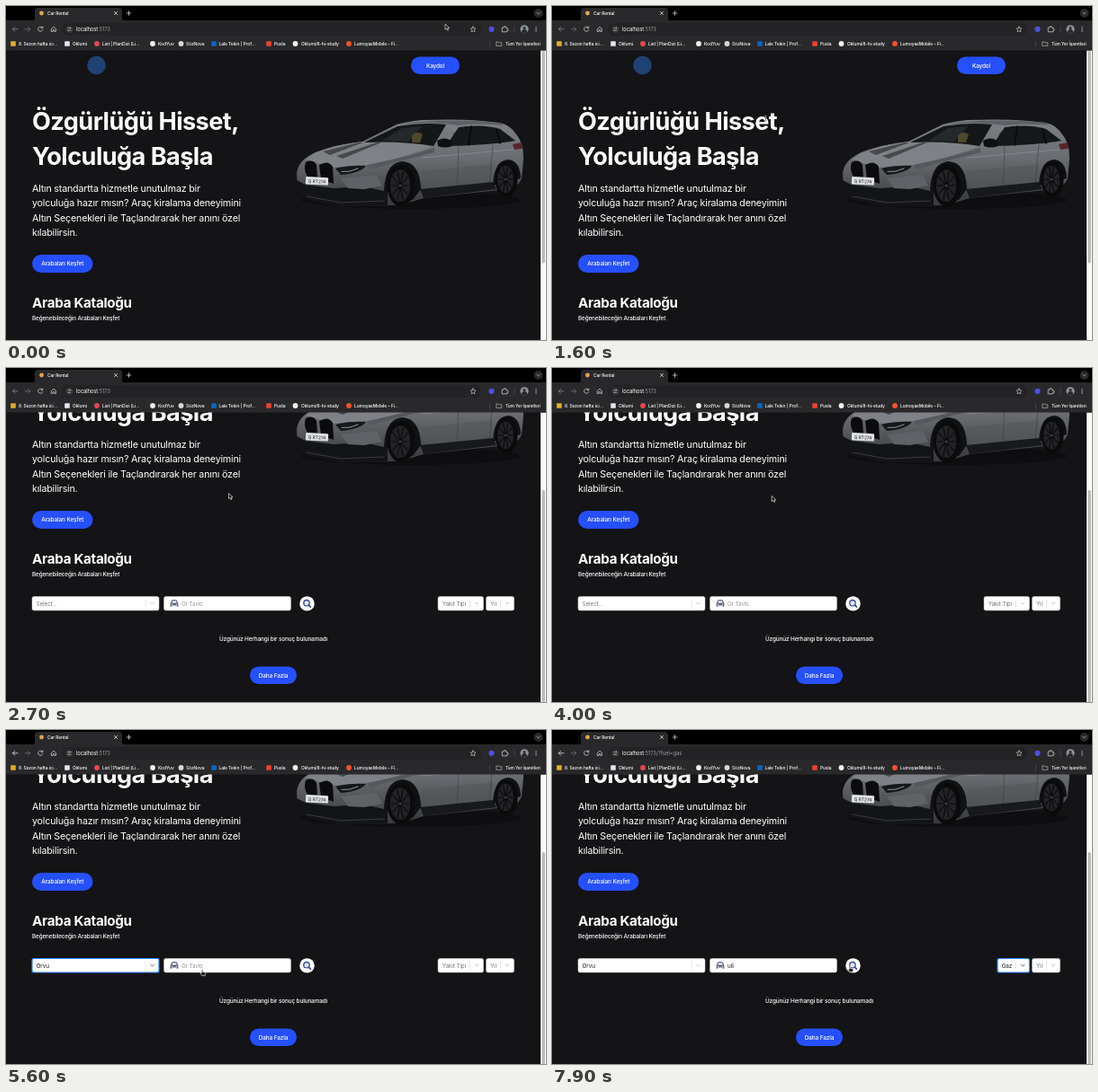
An HTML page that plays this animation: 600 px wide and 372 px high, repeating every 8000 ms.

```html
<!DOCTYPE html>
<html lang="tr">
<head>
<meta charset="utf-8">
<title>Car Rental</title>
<style>
html, body { margin: 0; width: 100%; height: 100%; overflow: hidden; background: #141316; }
svg { display: block; width: 100vw; height: 100vh; }
text { font-family: Inter, "Noto Sans", sans-serif; letter-spacing: -0.018em; white-space: pre; }
</style>
</head>
<body>
<svg id="stage" viewBox="0 0 600 372" xmlns="http://www.w3.org/2000/svg"></svg>
<script>
const LOOP = 8000, MAX_SCROLL = 118, BLUE = '#264fff', FOCUS = '#2684ff';
const brands = ['Ovira', 'Beta Soreno', 'Calder Morvin', 'Orvu', 'Harvelt', 'QZT'];
const fuels = ['Gaz', 'Dizel', 'Elektrik'];

// Markup helpers
const text = (x, y, size, s, fill = '#fff', more = '') =>
  `<text x="${x}" y="${y}" font-size="${size}" fill="${fill}" ${more}>${s}</text>`;
const rect = (x, y, w, h, fill, r = 0, more = '') =>
  `<rect x="${x}" y="${y}" width="${w}" height="${h}" rx="${r}" fill="${fill}" ${more}/>`;
const dot = (x, y, r, fill, more = '') => `<circle cx="${x}" cy="${y}" r="${r}" fill="${fill}" ${more}/>`;
const path = (d, fill, more = '') => `<path d="${d}" fill="${fill}" ${more}/>`;
const line = (d, color, w = 0.7, more = '') =>
  path(d, 'none', `stroke="${color}" stroke-width="${w}" stroke-linecap="round" stroke-linejoin="round" ${more}`);
const MEDIUM = 'font-weight="500"', MIDDLE = 'text-anchor="middle"';
const pill = (x, y, w, h, label) =>
  rect(x, y, w, h, BLUE, h / 2) + text(x + w / 2, y + h / 2 + 2.3, 6.4, label, '#fff', `${MEDIUM} ${MIDDLE}`);
const chevron = (x, y, id) => line(`M${x - 2} ${y - 1}l2 2 2-2`, '#bbb', 0.8, `id="${id}"`);

function wheel(x, y, rx, ry) {
  let s = `<ellipse cx="${x}" cy="${y}" rx="${rx}" ry="${ry}" fill="#0b0b0c"/>` +
    `<ellipse cx="${x - 1}" cy="${y}" rx="${rx * 0.72}" ry="${ry * 0.76}" fill="#222326"/>`;
  for (let i = 0; i < 10; i++) {
    const a = i * Math.PI / 5;
    s += line(`M${x - 1} ${y}l${(rx * 0.65 * Math.cos(a)).toFixed(1)} ${(ry * 0.7 * Math.sin(a)).toFixed(1)}`, '#0a0a0b', 1.1);
  }
  return s + dot(x - 1, y, 1.5, '#3c3e42');
}

function car() {
  return '<ellipse cx="450" cy="216" rx="122" ry="10" fill="#0c0b0d" opacity=".7"/>' +
    // body
    path('M323 186Q325 171 344 163Q368 154 396 151L434 132Q444 129 462 127Q515 125 548 130Q560 132 567 143Q575 152 575 170L573 192Q569 202 556 204L464 214L438 222L372 223L333 214Q323 206 323 186Z', 'url(#paint)') +
    path('M436 132Q480 124 548 130L553 133Q528 130 503 133L486 131Q460 129 436 132Z', '#5d6064') +
    // hood and its stripes
    path('M344 163Q368 154 396 151Q440 149 474 156Q446 168 402 177L362 180L333 171Z', '#7e8185') +
    path('M352 162L392 152 397 152 360 166ZM367 167L412 152 417 152 374 170Z', '#46484c') +
    path('M402 177Q446 168 476 158L476 163Q440 172 404 182Z', '#55585c') +
    // glass
    path('M398 152L435 134Q462 129 489 132L475 156Q440 150 398 152Z', '#141618') +
    path('M418 150L440 136 462 134 447 151Z', '#25292b') +
    path('M451 144q6-6 12-1l-3 9h-9zM497 142q5-5 9-1l-3 11h-7z', '#4d472c') +
    path('M489 156L503 135Q531 131 549 137L566 150Q540 155 489 156Z', '#15181a') +
    line('M517 134l-3 21M545 137l4 16', '#08090a', 1.6) +
    path('M479 150q8-5 16 0l1 6q-9 3-16 0z', '#0e0f10') +
    // side
    line('M462 169L574 159', '#8d9094', 0.8) +
    path('M462 184L541 176 541 198 463 206Z', '#55585c', 'opacity=".6"') +
    line('M503 156l-2 52M541 154l-4 44', '#3c3e42', 0.6) +
    path('M460 204L541 196 545 204 464 214Z', '#18191b') +
    // nose
    path('M333 174Q341 170 345 177L346 191 335 190Q330 182 333 174ZM348 177Q358 171 363 179L364 198 350 193Z', '#0b0b0d') +
    path('M366 181Q382 177 400 178Q394 186 372 188Z', '#15181b') +
    line('M373 184.5q9 1 18-3.5', '#aeb6bd', 0.8) +
    path('M323 194L333 199 364 203 398 201 424 207 424 222 372 224 333 215Q324 207 323 194Z', '#131416') +
    path('M372 192L412 188 418 200 398 204 380 203Z', '#5f6266') +
    line('M334 212L372 219 420 217', '#3f4145', 0.9) +
    rect(333, 190.5, 25, 8.5, '#dfe1e4', 1, 'transform="rotate(3 345 195)"') +
    text(335.5, 197.2, 5, 'Q RT274', '#222', 'transform="rotate(3 345 195)"') +
    path('M420 206Q421 175 440 173Q460 174 461 204L452 216Z', '#101113') +
    wheel(439, 200, 15.5, 23.5) +
    path('M541 200Q542 172 558 171Q571 172 572 192Z', '#101113') +
    wheel(556, 193, 12.5, 20) +
    path('M563 154l10-2 1 7-9 1z', '#54262a');
}

function page() {
  const bold = (x, y, size, s) => text(x, y, size, s, '#fff', 'font-weight="700" style="letter-spacing:-.02em"');
  const para = ['Altın standartta hizmetle unutulmaz bir', 'yolculuğa hazır mısın? Araç kiralama deneyimini',
    'Altın Seçenekleri ile Taçlandırarak her anını özel', 'kılabilirsin.'];
  const box = (x, w, id) => rect(x, 372.5, w, 15.5, '#fff', 2, `id="${id}" stroke="#ccc" stroke-width=".5"`);
  return dot(100.5, 66, 10.3, '#1f4272') + pill(450, 56.5, 54, 19.5, 'Kaydol') +
    bold(29, 138, 27.1, 'Özgürlüğü Hisset,') + bold(29, 177, 27.1, 'Yolculuğa Başla') +
    para.map((s, i) => text(29, 206.7 + i * 16.5, 10.7, s)).join('') +
    pill(29, 277, 67.5, 20, 'Arabaları Keşfet') + car() +
    bold(29, 336.3, 15.2, 'Araba Kataloğu') +
    text(29, 350.2, 6.35, 'Beğenebileceğin Arabaları Keşfet', '#fff', MEDIUM) +
    box(29, 141, 'brandBox') + text(33.5, 382.6, 6.4, '', '#777', 'id="brandText"') +
    line('M155 376v8.5', '#ccc', 0.5) + chevron(162.5, 380.2, 'brandArrow') +
    box(175.5, 141, 'modelBox') +
    path('M182.6 380.2l1.6-3.6q2.8-1 5.6 0l1.6 3.6v3.6h-1.7v-1.2h-5.4v1.2h-1.7z', '#626a82') +
    path('M184.3 379.4l.8-2h3.8l.8 2z', '#fff') + dot(184.3, 381.3, 0.6, '#fff') + dot(189.7, 381.3, 0.6, '#fff') +
    text(195, 382.5, 6.2, '', '#999', 'id="modelText"') +
    dot(334.5, 380.4, 8.2, '#fff') +
    dot(334, 379.7, 3.2, '#e2e9fb', 'stroke="#38478f" stroke-width="1.3"') + line('M336.4 382.1l2 2', '#38478f', 1.6) +
    box(480, 50.5, 'fuelBox') + text(484.7, 382.6, 6.4, '', '#777', 'id="fuelText"') +
    line('M515.5 376v8.5', '#ccc', 0.5) + chevron(523, 380.2, 'fuelArrow') +
    box(533.5, 31, 'yearBox') + text(538, 382.6, 6.4, 'Yıl', '#777') +
    line('M549.5 376v8.5', '#ccc', 0.5) + chevron(557, 380.2, 'yearArrow') +
    text(297, 421.7, 6.4, 'Üzgünüz Herhangi bir sonuç bulunamadı', '#fff', `${MEDIUM} ${MIDDLE}`) +
    pill(271, 450.5, 52, 19.5, 'Daha Fazla') +
    menu('brandMenu', 29, 141, 125, brands) +
    menu('fuelMenu', 480, 50.5, 53, fuels);
}

function menu(id, x, w, h, items) {
  const bar = items.length > 3 ? rect(x + w - 5, 391, 5, h, '#f2f2f2') + rect(x + w - 4, 393, 3.2, 12, '#b9b9b9', 1.6) : '';
  return `<g id="${id}">` + rect(x, 391, w, h, '#fff', 2, 'stroke="#ccc" stroke-width=".4"') +
    rect(x, 392.8, w - (bar ? 5 : 0), 16.4, '#deebff', 0, `id="${id}Hover"`) +
    items.map((s, i) => text(x + 5, 403.3 + i * 16.4, 6.4, s, '#222')).join('') + bar + '</g>';
}

function browser() {
  const grey = '#c9c9cb';
  const marks = [
    [8, '#e0ae2f', 14, '8. Sezon hafta ici...', 1], [68, '#dfe6f2', 74, 'Oklumi', 1],
    [101, '#e5484d', 107, 'List | PlanDizi (Li...'], [163, '#f2f2f2', 169, 'KodYuv'],
    [194.5, '#d8d8d8', 200, 'SözNova'], [231, '#0a66c2', 236.5, 'Lale Tekin | Prof...', 1],
    [292, '#ea4335', 298, 'Pusla', 1], [321.5, '#f2f2f2', 328, 'Oklumi/8-hi-study'],
    [381, '#f0532d', 387, 'LumoyasMobile – Fi...']];
  return rect(0, 0, 600, 16.5, '#000') + rect(0, 16, 600, 33.5, '#29292b') +
    path('M29 16.5q3 0 3-3V6q0-4 4-4h89q4 0 4 4v7.5q0 3 3 3z', '#29292b') +
    dot(39.5, 8, 2.4, '#e3a54f') + text(46, 9.8, 4.9, 'Car Rental', '#fff', MEDIUM) +
    line('M120.4 6.4l3.2 3.2m0-3.2l-3.2 3.2M134.2 8h4.6m-2.3-2.3v4.6', '#eee', 0.7) +
    dot(591.5, 8, 5, '#29292b') + line('M589.8 7.3l1.7 1.6 1.7-1.6', '#ddd') +
    line('M13 25.8h-5.6m2.4-2.4l-2.4 2.4 2.4 2.4', '#888', 0.8, 'id="back"') +
    line('M21.2 25.8h5.6m-2.4-2.4l2.4 2.4-2.4 2.4', '#737376', 0.8) +
    line('M40.5 24.4a2.6 2.6 0 1 0 .2 2.2M40.8 22.8v1.8h-1.8', grey, 0.8) +
    line('M50.6 25.4l2.4-2.2 2.4 2.2v3h-1.6v-1.8h-1.6v1.8h-1.6z', grey, 0.8) +
    rect(62, 19, 466, 14, '#232325', 7) + dot(70.5, 25.8, 4.4, '#343437') +
    line('M68.7 24.5h2m-2 2.6h.5m1 0h2', grey, 0.6) + dot(71.6, 24.5, 0.7, grey) + dot(69.6, 27.1, 0.7, grey) +
    `<text x="78" y="27.9" font-size="5.85" fill="#fff">localhost<tspan fill="#9a9a9d" id="url"></tspan></text>` +
    line('M519 22.9l.9 1.9 2.1.3-1.5 1.5.4 2.1-1.9-1-1.9 1 .4-2.1-1.5-1.5 2.1-.3z', grey, 0.7) +
    dot(539.5, 25.8, 3.1, '#4c50dc') +
    line('M551.6 24h1.7a1 1 0 1 1 1.8 0h1.6v1.6a1 1 0 1 1 0 1.8v1.4h-5.1z', grey, 0.8) +
    line('M565 22.5v6.5', '#55555a', 0.6) +
    dot(576, 25.8, 4.6, '#8d959b') + dot(576, 24.4, 1.5, '#25282b') + path('M573 29.2q0-3.2 3-3.2t3 3.2q-3 1.8-6 0z', '#25282b') +
    [23.6, 25.8, 28].map(y => dot(589, y, 0.7, grey)).join('') +
    marks.map(([x, c, tx, s, sq]) =>
      (sq ? rect(x - 2.8, 39.2, 5.6, 5.6, c, 0.6) : dot(x, 42, 2.9, c)) + text(tx, 43.8, 4.95, s, '#fff', MEDIUM)).join('') +
    line('M537.5 39v6', '#55555a', 0.6) +
    line('M545.2 40h2l.7.8h2.9v3.6h-5.6z', grey, 0.6) + text(555, 43.8, 4.8, 'Tüm Yer İşaretleri', '#fff', MEDIUM);
}

const edge = 'stroke="#fff" stroke-width=".6" stroke-linejoin="round"';
const pointers = {
  arrow: path('M0 0v6.2l1.5-1.3 1 2.2 1-.5-.9-2.1h1.9z', '#111', edge),
  hand: path('M-.7 0q.7-.8 1.3 0v2.3l2.6.7q.7.3.5 1.2l-.5 2.4h-3.5l-2-2.7q0-.8 1-.4l.6.6z', '#111', edge),
  beam: line('M-1.2 0q1.2 0 1.2.8v4.8q0 .8-1.2.8M1.2 0q-1.2 0-1.2.8M1.2 6.4q-1.2 0-1.2-.8M-.7 3.8h1.4', '#8c8c8e', 0.8)
};

const stage = document.getElementById('stage');
stage.innerHTML =
  '<defs><linearGradient id="paint" x1="0" y1="0" x2="0" y2="1"><stop offset="0" stop-color="#7d8084"/>' +
  '<stop offset=".45" stop-color="#696c70"/><stop offset="1" stop-color="#36383b"/></linearGradient></defs>' +
  rect(0, 0, 600, 372, '#141316') + `<g id="page">${page()}</g>` +
  rect(594, 49.5, 6, 323, '#fafafa') + rect(595.3, 50, 3.6, 236.5, '#bdbdbd', 1.8, 'id="thumb"') +
  browser() + '<g id="mouse">' +
  Object.entries(pointers).map(([k, s]) => `<g id="${k}">${s}</g>`).join('') + '</g>';

const el = {};
stage.querySelectorAll('[id]').forEach(e => el[e.id] = e);
const set = (id, name, v) => el[id].setAttribute(name, v);
const show = (id, on) => set(id, 'visibility', on ? 'visible' : 'hidden');
const label = (id, s, fill) => { el[id].textContent = s; set(id, 'fill', fill); };
const smooth = p => { p = Math.min(1, Math.max(0, p)); return p * p * (3 - 2 * p); };

// time, x, y of the pointer
const trail = [[0, 488, 20], [250, 488, 20], [1300, 250, 112], [1600, 237.5, 122], [2050, 247.5, 139.5],
  [3950, 247.5, 139.5], [4500, 110, 261], [4650, 110, 261], [4900, 50.5, 292], [5130, 49, 330],
  [5260, 49, 330], [5600, 218, 267], [5850, 216, 260], [6600, 216, 260], [6930, 508, 260],
  [7030, 508, 260], [7200, 504, 281], [7400, 504, 281], [7850, 331, 263], [LOOP, 331, 263]];

function pointer(t) {
  const i = Math.max(1, trail.findIndex(k => k[0] > t));
  const [t0, x0, y0] = trail[i - 1], [t1, x1, y1] = trail[i];
  const p = smooth((t - t0) / (t1 - t0));
  return [x0 + (x1 - x0) * p, y0 + (y1 - y0) * p];
}

function focus(name, on) {
  set(name + 'Box', 'stroke', on ? FOCUS : '#ccc');
  set(name + 'Box', 'stroke-width', on ? 1.2 : 0.5);
  set(name + 'Arrow', 'stroke', on ? '#555' : '#bbb');
}

function render(t) {
  const scroll = MAX_SCROLL * smooth((t - 2170) / 500);
  set('page', 'transform', `translate(0 ${-scroll})`);
  set('thumb', 'y', 50 + scroll * 86 / MAX_SCROLL);

  const [x, y] = pointer(t);
  const row = n => Math.min(n - 1, Math.max(0, Math.floor((y + MAX_SCROLL - 392.8) / 16.4)));
  const picked = t >= 5250, gas = t >= 7300;
  focus('brand', t >= 4600 && t < 5850);
  show('brandMenu', t >= 4600 && !picked);
  set('brandMenuHover', 'y', 392.8 + 16.4 * row(brands.length));
  label('brandText', picked ? 'Orvu' : 'Select...', picked ? '#222' : '#777');

  const typed = 'u6'.slice(0, t < 6200 ? 0 : t < 6400 ? 1 : 2);
  label('modelText', typed || 'Ör Tavlo', typed ? '#222' : '#999');

  const left = gas ? 495 : 480;
  focus('fuel', t >= 7000);
  show('fuelMenu', t >= 7000 && !gas);
  set('fuelMenuHover', 'y', 392.8 + 16.4 * row(fuels.length));
  set('fuelBox', 'x', left);
  set('fuelBox', 'width', 530.5 - left);
  set('fuelText', 'x', left + 4.7);
  label('fuelText', gas ? 'Gaz' : 'Yakıt Tipi', gas ? '#222' : '#777');

  el.url.textContent = gas ? ':5173/?fuel=gas' : ':5173';
  set('back', 'stroke', t >= 4600 ? '#e4e4e6' : '#888');

  const kind = (t > 1250 && t < 1800) || (t > 5750 && t < 6680) ? 'beam'
    : (t > 5500 && t <= 5750) || t > 7780 ? 'hand' : 'arrow';
  for (const k in pointers) show(k, k === kind);
  set('mouse', 'transform', `translate(${x} ${y})`);
}

function tick() {
  render(performance.now() % LOOP);
  requestAnimationFrame(tick);
}
tick();
</script>
</body>
</html>
```
